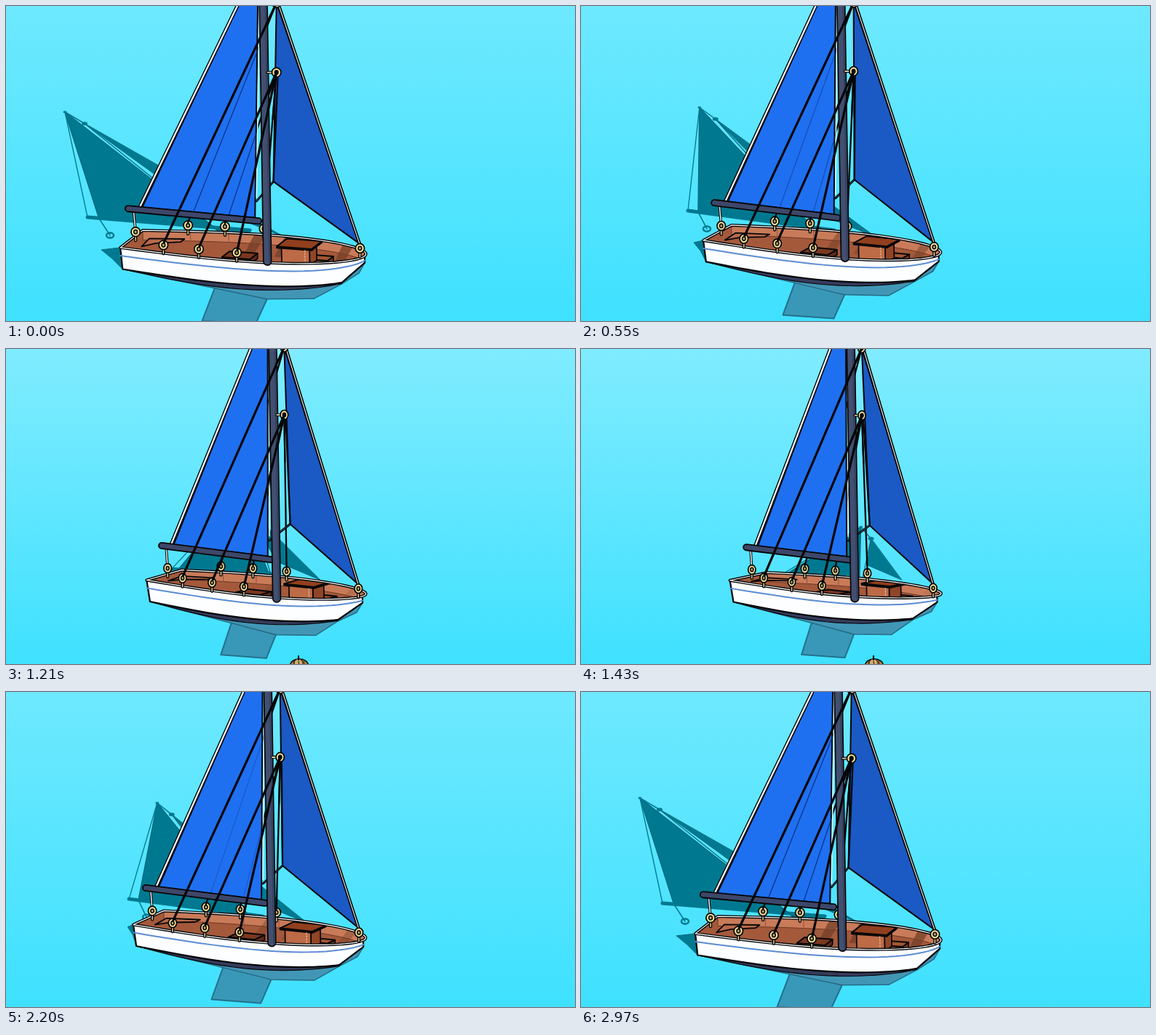
Write an HTML page with a canvas that moves like this. It is 782x434 px and loops after 3080 ms.

```html
<!DOCTYPE html>
<html lang="en">
<head>
<meta charset="utf-8">
<title>Sailing boat</title>
<style>
html, body { margin: 0; width: 100%; height: 100%; overflow: hidden; background: #54e5ff; }
canvas { display: block; }
</style>
</head>
<body>
<canvas id="stage" width="782" height="434"></canvas>
<script>
const ctx = document.getElementById('stage').getContext('2d');
const STEP = 110, COUNT = 28, INK = '#050608';

// The boat is a solid model: t runs stern to bow, s near side to far side, h upwards.
let turn = 0, stern, bow, side, up;
const curve = (a, b, c = 0) => a + b * turn + c * turn * turn;

function aim(n) {
  turn = n;
  stern = [curve(172.5, 2.07, 0.183), curve(321, -2.42, 0.141)];
  bow = [curve(493, -0.28), curve(344.5, -0.35)];
  side = [curve(17.5, 0.9), curve(-13.5, 0.15, 0.032)];
  up = [-0.016, curve(-1.02, 0.0025)];
}
const at = (t, s, h) => [0, 1].map(i => stern[i] + (bow[i] - stern[i]) * t + side[i] * s + up[i] * h);
const mix = (a, b, t) => [a[0] + (b[0] - a[0]) * t, a[1] + (b[1] - a[1]) * t];
const move = (p, x, y) => [p[0] + x, p[1] + y];

// Hull lines: edge is -1 for the near side and 1 for the far side.
const beam = t => (0.88 + 0.45 * t) * Math.sqrt(1 - t ** 4);
const bulge = t => Math.sin(Math.PI * t);
const rim = (t, edge, h = 0) => at(t, edge * beam(t), h + 3.5 * edge * bulge(t));
const waterline = (t, drop = 0) =>
  at(t, -0.83 * beam(t), -31 - 7 * bulge(t) + 4 * t ** 8 - drop * bulge(t));
const trace = (f, end = 1) => Array.from({ length: 25 }, (_, i) => f(end * (1 - (1 - i / 24) ** 2)));

function path(pts, fill, stroke, width = 2, open = false) {
  ctx.beginPath();
  pts.forEach(p => ctx.lineTo(p[0], p[1]));
  if (!open) ctx.closePath();
  if (fill) { ctx.fillStyle = fill; ctx.fill(); }
  if (stroke) { ctx.strokeStyle = stroke; ctx.lineWidth = width; ctx.stroke(); }
}
const line = (a, b, width, color = INK) => path([a, b], null, color, width, true);
function tube(a, b, width, color, edge = 1.5) {
  line(a, b, width);
  line(a, b, width - 2 * edge, color);
}
function oval([x, y], rx, ry, fill, stroke, width = 1.5) {
  ctx.beginPath();
  ctx.ellipse(x, y, rx, ry, 0, 0, Math.PI * 2);
  if (fill) { ctx.fillStyle = fill; ctx.fill(); }
  if (stroke) { ctx.strokeStyle = stroke; ctx.lineWidth = width; ctx.stroke(); }
}
function ring(p, peg = 12) {
  if (peg) tube(move(p, 0, 5), move(p, 0, peg), 4.2, '#f0dfa6', 1.4);
  const rx = 6.2 - turn * 0.08;
  oval(p, rx, 6.4, '#f3df96', INK, 1.7);
  oval(p, rx * 0.38, 2.6, '#b9a468', INK, 1.5);
}
function box(t0, t1, s0, s1, h0, h1, top, front, end) {
  const corners = (h, list) => list.map(([t, s]) => at(t, s, h));
  const wall = (a, b, color) => path([...corners(h1, [a, b]), ...corners(h0, [b, a])], color, INK, 1.7);
  wall([t1, s0], [t1, s1], end);
  wall([t0, s0], [t1, s0], front);
  path(corners(h1, [[t0, s0], [t0, s1], [t1, s1], [t1, s0]]), top, INK, 2);
}

function drawSky(far) {
  const g = ctx.createLinearGradient(0, 0, 0, 434);
  g.addColorStop(0, far ? '#80ecff' : '#6ee9ff');
  g.addColorStop(0.5, far ? '#60e6ff' : '#57e5ff');
  g.addColorStop(1, '#3fe1ff');
  ctx.fillStyle = g;
  ctx.fillRect(0, 0, 782, 434);
}

function drawShade() {
  const dark = '#007990', rimmed = '#046b80';
  const tip = [curve(81, 12, 0.873), curve(146, -6.8, 1.11)];
  const end = [curve(112, 4.1, 0.58), curve(291, -4.27, 0.49)];
  const foot = [curve(330, 4), 340], boom = [curve(335, 2.5), 309];
  const jibTop = move(tip, 27 - turn, 16), jibEnd = [curve(382, 4.5), 318];
  const clew = [curve(250, 11), curve(265, 2.5)], block = move(end, 31 - turn, 25);

  path([rim(0, -1), move(rim(0, -1), 2.6 * turn - 26, 3),
        move(waterline(0), 1.5 * turn - 15, -15), waterline(0)], dark, rimmed, 1);
  path([jibTop, clew, jibEnd], dark, rimmed, 1);
  path([tip, mix(end, boom, 0.07), boom, foot], dark, rimmed, 1.5);
  line(end, boom, 5, dark);
  line(end, tip, 1.3, dark);
  line(tip, jibTop, 1.5, dark);
  line(jibTop, foot, 1.2, rimmed);
  line(mix(end, boom, 0.07), block, 1.5, dark);
  oval(block, 5, 3.5, null, dark, 2.5);
  oval(tip, 2.5, 1.5, dark);
  oval(jibTop, 4, 2.5, dark);
}

function drawHull() {
  const near = trace(t => rim(t, -1)), far = trace(t => rim(t, 1)).reverse();
  const water = [...trace(waterline, 0.93), at(1, 0, -9)];
  const belly = at(0.6, -0.4, -62), chin = at(0.8, -0.4, -57);

  path([at(0.38, -0.4, -49), at(0.32, -0.4, -98), at(0.55, -0.4, -96), belly], '#3998b8', '#23708c', 2);
  path([...water, at(0.98, -0.1, -22), waterline(0.93, 8), chin, belly], '#4296b5', '#256b85', 1.5);
  path([...trace(t => waterline(t, 6), 0.93), ...trace(waterline, 0.93).reverse()], '#353b5b', INK, 1.2);
  path([...near, ...water.slice().reverse()], '#fdfeff', INK, 2.2);
  path(trace(t => rim(t, -1, 5 * t ** 8 - 11)), null, '#5b8cd2', 2, true);
  drawDeck(near, far);
  path([...near, ...far], null, INK, 4);
  path([...near, ...far], null, '#fff', 1.2);
}

function drawDeck(near, far) {
  ctx.save();
  path([...near, ...far], '#a4593b');
  ctx.clip();
  path([...far, ...trace(t => rim(t, 1, -13))], '#c97b59', '#6d3823', 1);
  for (let t = 0.2; t < 0.7; t += 0.16) line(rim(t, 1), rim(t, 1, -13), 1, '#95533a');
  ctx.globalAlpha = 0.75 - turn * 0.05;
  for (const t of [0.47, 0.6, 0.86]) {
    path([rim(t, 1), rim(t + 0.05, 1), at(t + 0.04, 0.2, -13), at(t, 0.2, -13)], '#744028');
  }
  ctx.globalAlpha = 1;
  path([at(0.07, -0.5, -2), at(0.06, 0.3, -2), at(0.2, 0.5, -2), at(0.2, 0.2, -2), at(0.11, -0.1, -2)],
       '#b9694a', INK, 1.8);
  box(0.42, 0.54, -0.6, 0, -14, -7, '#7c371f', '#94502f', '#5d2917');
  box(0.78, 0.86, -0.35, 0.1, -14, -5, '#a3562f', '#94502f', '#743a20');
  box(0.66, 0.78, -0.3, 0.25, -14, 8, '#913f1e', '#bd6b46', '#914526');
  box(0.645, 0.795, -0.4, 0.4, 8, 10, '#913f1e', '#682c18', '#682c18');
  ctx.setLineDash([2, 2]);
  line(at(0.76, -0.3, 6), at(0.76, -0.3, -12), 1, '#f0caa5');
  ctx.restore();
}

function drawRig() {
  const mast = [at(0.6, -0.33, 348), at(0.6, -0.33, -12)];
  const boom = [at(-0.015, 0.05, 40), at(0.555, -0.15, 39)];
  const luff = [at(0.585, -0.4, 390), at(0.54, -0.15, 43)], tail = at(0.045, 0.05, 43);
  const top = at(0.655, -0.3, 338), head = at(0.65, -0.3, 244);
  const clew = at(0.58, 0.6, 83), tack = at(0.975, 0, 17), prow = at(0.98, 0, 10);
  const quarter = at(0.018, 0, 10);
  const spots = [0.19, 0.345, 0.51], anchors = [top, head, head];
  const back = spots.map(t => rim(t, 1, 8)), front = spots.map(t => rim(t, -1, 11));

  back.forEach(p => ring(p));
  back.forEach((p, i) => line(anchors[i], move(p, 0, -4), 2.3));
  tube(clew, at(0.545, -0.1, 65), 3, '#456', 1);

  const sail = [...luff, tail];
  path(sail, '#1f70f0', INK, 2);
  ctx.save();
  ctx.globalAlpha = Math.max(0, 0.8 - turn * 0.075);
  path(sail);
  ctx.clip();
  for (const i of [0, 1]) line(anchors[i], back[i], 1.4, '#082a80');
  ctx.restore();

  tube(move(luff[0], -1, 0), move(tail, -3.5, 0), 5, '#fff', 1.4);
  tube(mix(...boom, 0.04), quarter, 3.6, '#fff', 1.1);
  line(move(luff[0], 2.2, 0), move(luff[1], 2, -28), 1.5, '#d9fbff');
  tube(...boom, 10, '#3d4769', 1.8);
  path([top, clew, tack], '#1b59c4', INK, 2);
  line(move(head, 2, 4), clew, 2.2);
  tube(move(top, 2, 0), move(prow, 0, -5), 4.3, '#f7f7ef', 1.6);

  tube(...mast, 12.5, '#424f70', 1.7);
  line(move(mast[0], 3, 0), move(mast[1], 3, 0), 2, '#34405f');
  tube([mast[0][0] + 6, head[1]], move(head, -5, 0), 4, '#f2e6bd', 1.2);
  line(head, mix(head, back[2], 0.3), 2.2);

  [quarter, ...front].forEach(p => ring(p));
  [head, top].forEach(p => ring(p, 0));
  front.forEach((p, i) => line(anchors[i], move(p, 1, -4), 3.2));
  oval(head, 2.3, 3, INK);
  ring(prow);
}

function drawFloat(late) {
  oval([403, 436], 12.5, 9, '#a87d4a', INK);
  oval([402, 433], 6, 6, late ? '#4f9b61' : '#d1ad73', '#44301b', 1.2);
  for (let x = 395; x < 410; x += 7) line([x, 430], [x + 1, 436], 1.2, '#3e2d1c');
  line([402, 423], [402, 428], 2);
}

function draw(step) {
  aim(Math.min(step, COUNT - 1 - step));
  const far = turn >= 11;
  ctx.lineJoin = ctx.lineCap = 'round';
  drawSky(far);
  drawShade();
  drawHull();
  drawRig();
  if (far) drawFloat(step >= COUNT / 2);
}

let shown = -1;
function tick() {
  const step = Math.floor(performance.now() / STEP) % COUNT;
  if (step !== shown) draw(shown = step);
  requestAnimationFrame(tick);
}
tick();
</script>
</body>
</html>
```
